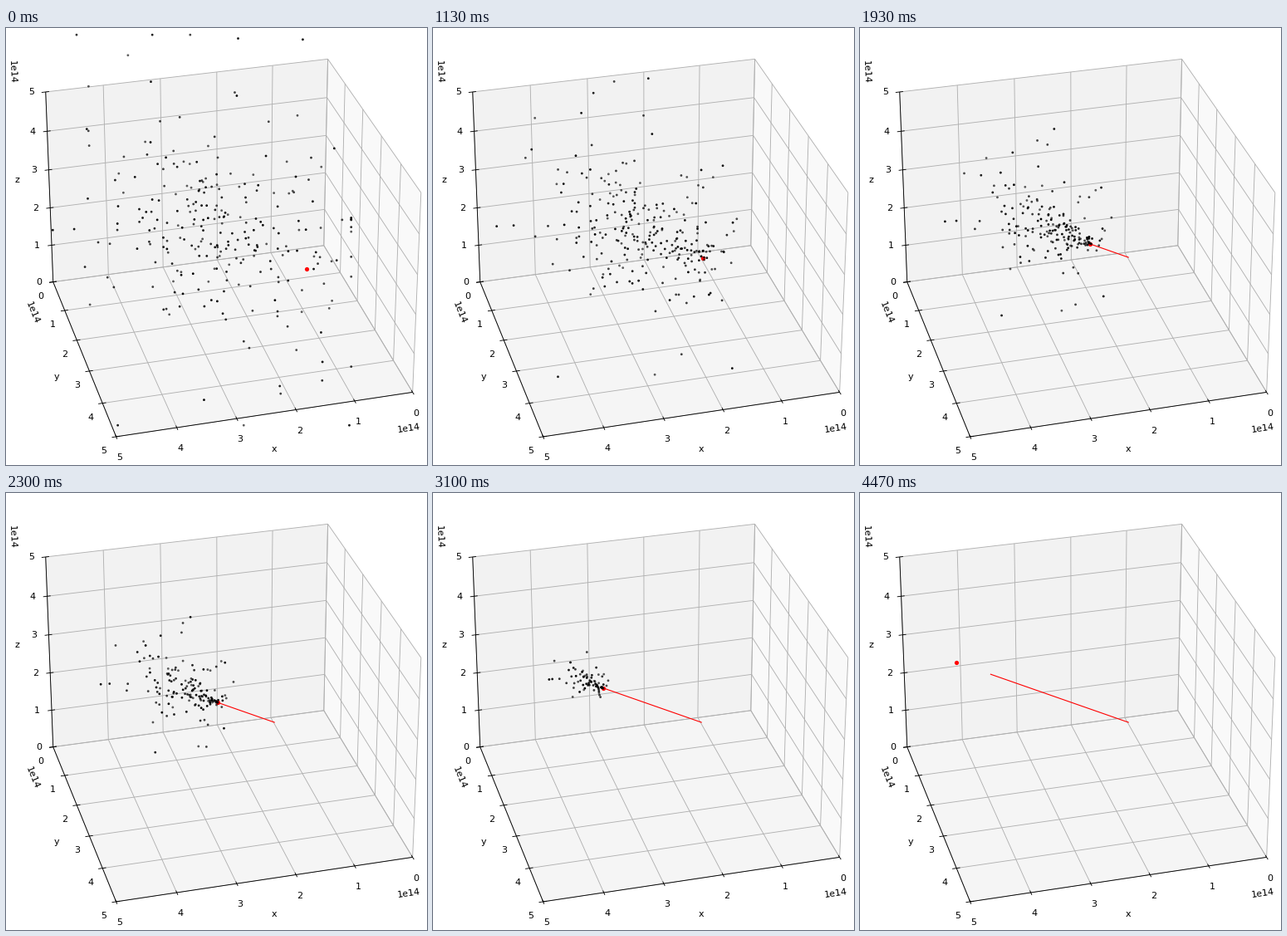
Animation of 507x526 px, one loop 5.01 s. Source, as a matplotlib script:

```python
import numpy as np
import matplotlib.pyplot as plt
from matplotlib.animation import FuncAnimation
from matplotlib.collections import LineCollection

W, H, DPI = 507, 526, 80
LOOP, TICK = 5010, 10            # ms
HOLD, LAST = 530, 119            # still time at the start, final step
ENTER, LEAVE = 20, 100           # steps between which the trail grows
COUNT = 260

plt.rcParams["font.family"] = "DejaVu Sans"
fig = plt.figure(figsize=(W / DPI, H / DPI), dpi=DPI, facecolor="white")
ax = fig.add_axes([0, 0, 1, 1])
ax.set_xlim(0.3, W + 0.3)
ax.set_ylim(H - 0.2, -0.2)
ax.axis("off")

# ---- perspective fitted to the box corners ----
CORNERS = {
    (5, 0, 0): (57, 305), (0, 0, 0): (383, 262), (0, 0, 5): (388, 37),
    (5, 0, 5): (48, 77), (0, 5, 0): (490, 438), (5, 5, 0): (133, 492),
    (0, 5, 5): (500, 198),
}


def fit_camera():
    rows, rhs = [], []
    for (x, y, z), (u, v) in CORNERS.items():
        rows.append([x, y, z, 1, 0, 0, 0, 0, -u * x, -u * y, -u * z])
        rows.append([0, 0, 0, 0, x, y, z, 1, -v * x, -v * y, -v * z])
        rhs += [u, v]
    sol = np.linalg.lstsq(np.array(rows, float), np.array(rhs, float), rcond=None)[0]
    return np.append(sol, 1).reshape(3, 4)


CAMERA = fit_camera()


def project(*point):
    u, v, w = CAMERA @ np.array([*point, 1.0])
    return u / w, v / w


def path(*points):
    return [project(*p) for p in points]


def label(spot, text, shift=(0, 0), angle=0):
    ax.text(spot[0] + shift[0], spot[1] + shift[1], text, fontsize=10,
            ha="center", va="center", rotation=angle, zorder=4)


# ---- panes, grid, ticks, labels ----
PANES = {
    "#f9f9f9": path((0, 0, 0), (0, 5, 0), (0, 5, 5), (0, 0, 5)),
    "#f2f2f2": path((0, 0, 0), (5, 0, 0), (5, 0, 5), (0, 0, 5)),
    "#f5f5f5": path((0, 0, 0), (5, 0, 0), (5, 5, 0), (0, 5, 0)),
}
for color, pane in PANES.items():
    ax.fill(*zip(*pane), color=color, lw=0, zorder=1)

grid = []
dark = [path((0, 5, 0), (5, 5, 0), (5, 0, 0), (5, 0, 5))]
for n in range(6):
    grid += [path((n, 5, 0), (n, 0, 0), (n, 0, 5)),
             path((5, n, 0), (0, n, 0), (0, n, 5)),
             path((5, 0, n), (0, 0, n), (0, 5, n))]
    dark += [path((n, 4.94, 0), (n, 5.07, 0)),
             path((4.94, n, 0), (5.07, n, 0)),
             path((4.94, 0, n), (5.07, 0, n))]
    label(project(n, 5, 0), str(n), (4, 25.3))
    label(project(5, n, 0), str(n), (-14.5, 17.3))
    label(project(5, 0, n), str(n), (-17.3, 0.5))

for lines, color, order in ((grid, "#b0b0b0", 2), (dark, "black", 3)):
    ax.add_collection(LineCollection(lines, colors=color, linewidths=0.8, zorder=order),
                      autolim=False)

label((323, 507), "x")
label((61, 420), "y")
label((14, 183), "z")
label((486, 481.5), "1e14", angle=8.6)
label((32.3, 343), "1e14", angle=-67.9)
label((8, 53), "1e14", angle=-87.7)


# ---- motion ----
def tracer(k):
    """Place of the red particle at step k."""
    k = np.asarray(k, float)
    return np.stack([362.5 - 1.925 * k - 0.00123 * k**2,
                     289.5 - 0.674 * k - 0.00041 * k**2], axis=-1)


# Each particle runs straight to the tracer and vanishes on meeting it.
rng = np.random.default_rng(12)
meet = np.linspace(ENTER, LEAVE, COUNT)
goal = tracer(meet)
spread = rng.uniform(0.3, 1.3, (COUNT, 1)) * rng.normal(0, 1, (COUNT, 2))
start = (goal + (265, 240)) / 2 + spread * (85, 95)
start = np.clip(start, (45, 8), (416, 478))

shade = np.zeros((COUNT, 4))
shade[:, 3] = rng.uniform(0.62, 1, COUNT)


def dot_area(pixels):
    return (pixels * 72 / DPI) ** 2


trail, = ax.plot([], [], color="red", lw=1, zorder=5)
red = ax.scatter([0], [0], s=dot_area(5.2), c="red", linewidths=0, zorder=6)
dots = ax.scatter(start[:, 0], start[:, 1], s=dot_area(2.8), c=shade,
                  linewidths=0, zorder=7)


def step_at(ms):
    if ms < HOLD:
        return 0
    return min(LAST, 1 + (ms - HOLD) * 3 // 100)


def update(i):
    k = step_at(i * TICK)
    alive = meet > k
    share = (k / meet[alive])[:, None]
    dots.set_offsets(start[alive] + (goal[alive] - start[alive]) * share)
    dots.set_facecolors(shade[alive])
    red.set_offsets([tracer(k)])
    tip = np.clip(k, ENTER, LEAVE)
    trail.set_data(*tracer([ENTER, tip]).T)
    trail.set_visible(k > ENTER)
    return trail, red, dots


anim = FuncAnimation(fig, update, frames=LOOP // TICK, interval=TICK,
                     repeat=True, repeat_delay=0)
plt.show()
```
